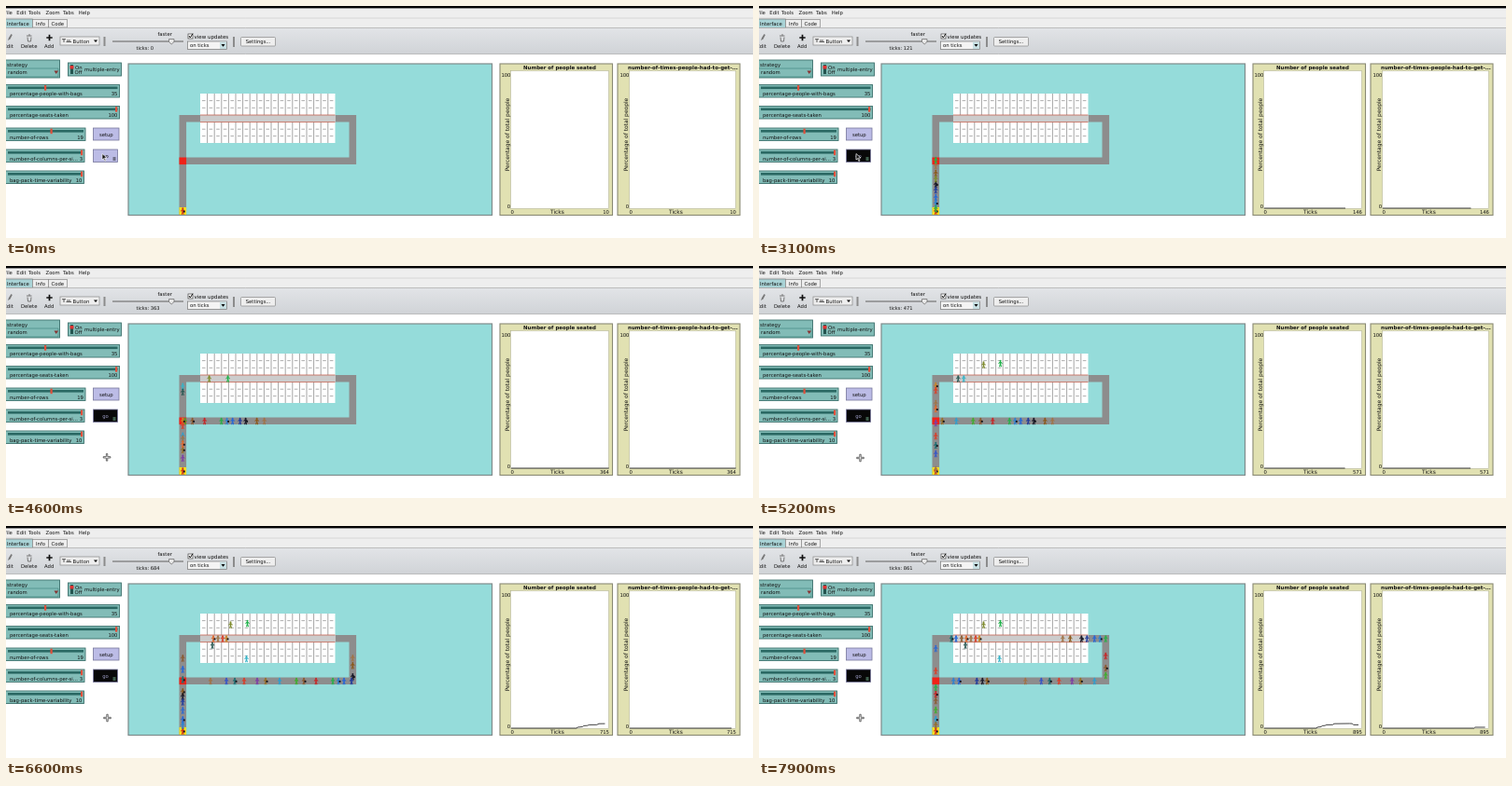
Write an HTML page that moves like this. It is 800 px wide and 249 px high and loops after 8000 ms.

```html
<!DOCTYPE html>
<html lang="en">
<head>
<meta charset="utf-8">
<title>Boarding model</title>
<style>
  html, body { margin: 0; width: 100%; height: 100%; overflow: hidden; background: #fff; }
  svg { display: block; width: 800px; height: 249px; }
  text { font: 5.3px "DejaVu Sans", sans-serif; fill: #111; white-space: pre; text-rendering: geometricPrecision; }
  .title { font-size: 5.46px; font-weight: bold; text-anchor: middle; }
  .axis { font-size: 5.95px; }
  .end { text-anchor: end; }
  .mid { text-anchor: middle; }
  .teal { fill: #82bcb7; stroke: #3d716d; stroke-width: .9; }
  .box { fill: #eee; stroke: #888; stroke-width: .7; }
  .lilac { fill: #bcbce6; stroke: #77779c; stroke-width: .8; }
  .line { fill: none; stroke: #111; stroke-width: .8; }
</style>
</head>
<body>
<svg id="stage" viewBox="0 0 800 249">
  <defs>
    <linearGradient id="bar" x2="0" y2="1">
      <stop stop-color="#e2e4e7"/><stop offset="1" stop-color="#d0d3d7"/>
    </linearGradient>
  </defs>

  <!-- menu, tabs, toolbar -->
  <rect width="800" height="24" fill="#eee"/>
  <rect width="800" height="2.4" fill="#000"/>
  <g>
    <text x="-2" y="8.8">File</text><text x="11.3" y="8.8">Edit</text><text x="24" y="8.8">Tools</text>
    <text x="42.5" y="8.8">Zoom</text><text x="61" y="8.8">Tabs</text><text x="77.7" y="8.8">Help</text>
  </g>
  <path d="M0 13H800" stroke="#ccc" stroke-width=".7"/>
  <rect x="-1" y="14" width="29.5" height="9.5" fill="#a9d3d6" stroke="#777" stroke-width=".7"/>
  <rect x="28.5" y="14.5" width="17" height="8.5" class="box"/>
  <rect x="45.5" y="14.5" width="20" height="8.5" class="box"/>
  <text x="1" y="20.5">Interface</text><text x="32" y="20.5">Info</text><text x="48.5" y="20.5">Code</text>
  <rect y="23.5" width="800" height="28" fill="url(#bar)"/>
  <path d="M0 23.5H800M0 51.5H800" stroke="#aaa" stroke-width=".7"/>

  <path d="M2 37L3 34L5.5 30L6.8 31L4.5 35.5Z" fill="#777"/>
  <path d="M22 32H27.5M23 33.5L23.5 38H26.5L27 33.5M24 31H26" fill="none" stroke="#777"/>
  <path d="M43.3 34H49.7M46.5 30.8V37.2" stroke="#111" stroke-width="1.7"/>
  <text x="-2.5" y="45">Edit</text><text x="16" y="45">Delete</text><text x="41" y="45">Add</text>
  <rect x="58" y="33" width="42" height="9" class="box"/>
  <path d="M60 35.7H64M62 35.7V39M64.5 38.5H70M65 37H69" fill="none" stroke="#333" stroke-width=".8"/>
  <text x="71.5" y="39.6">Button</text>
  <path d="M94 36.5H98L96 39Z"/>
  <path d="M105.5 33V43M244 33V44" stroke="#8c8c8c" stroke-width="2"/>
  <path d="M114 38H190" stroke="#888" stroke-width="1.4"/>
  <path d="M174.5 35.5H180V38.5L177.2 41L174.5 38.5Z" fill="#e8e8e8" stroke="#666" stroke-width=".7"/>
  <text x="162.5" y="31.5">faster</text>
  <text id="ticks" x="139.5" y="46.7" style="font-size:5.15px">ticks: 0</text>
  <rect x="195" y="30" width="5" height="5" fill="#fff" stroke="#444" stroke-width=".7"/>
  <path d="M196 32L197.3 34L200 29.7" fill="none" stroke="#111"/>
  <text x="201.5" y="34.7" style="font-size:5.5px">view updates</text>
  <rect x="194.5" y="38" width="42" height="8.5" fill="#f4f4f4" stroke="#777" stroke-width=".7"/>
  <text x="197" y="44">on ticks</text>
  <rect x="229" y="38.5" width="7" height="7.5" fill="#c7dfe2"/>
  <path d="M230.5 41H234.5L232.5 43.7Z"/>
  <rect x="251.5" y="33.5" width="37" height="9.5" rx="1" class="box"/>
  <text x="256.7" y="40">Settings...</text>

  <!-- controls -->
  <rect x="-1" y="58" width="58.5" height="19" class="teal"/>
  <path d="M0 67H56V76H0" fill="none" stroke="#3b827b" stroke-width=".6"/>
  <text x="1" y="65">strategy</text><text x="2" y="73.3">random</text>
  <path d="M51.5 69.5H56L53.7 73Z" fill="#833"/>
  <rect x="66.5" y="61" width="57" height="14" class="teal"/>
  <rect x="69" y="63" width="3" height="10" fill="#24544f"/>
  <rect x="68.5" y="64" width="4" height="3.5" fill="#d33"/>
  <text x="74" y="67.5">On</text><text x="73.5" y="73.3">Off</text><text x="84" y="70">multiple-entry</text>
  <g id="sliders"></g>
  <rect x="93.5" y="131" width="27.5" height="13" class="lilac"/>
  <text x="107.3" y="139.5" class="mid">setup</text>
  <rect id="goBox" x="93.5" y="154" width="26" height="13.5" class="lilac"/>
  <text id="goText" x="106.5" y="163" class="mid">go</text>
  <path id="goLoop" d="M114.5 163H117.5M114.5 165H117.5" stroke-width=".9"/>

  <!-- world -->
  <rect x="131" y="62" width="389.5" height="162.5" fill="#95dcda" stroke="#7f8a8a" stroke-width="1.2"/>
  <path d="M189.3 224V120.8H371.3V166.3H189.3" fill="none" stroke="#8d8d8d" stroke-width="7.6"/>
  <rect x="185.5" y="162.5" width="7.6" height="7.6" fill="#f02218"/>
  <rect x="185.5" y="216" width="7.6" height="8" fill="#f4e020"/>
  <rect x="208" y="94" width="144.5" height="53" fill="#fff"/>
  <rect x="208" y="117" width="144.5" height="7.6" fill="#ccc"/>
  <g id="seats"></g>
  <path d="M208 117H352.5M208 124.6H352.5" stroke="#c4614f" stroke-width=".8"/>
  <g id="people"></g>

  <g id="plots"></g>
  <path id="cursor" stroke-width=".7" stroke-linejoin="round"/>
</svg>
<script>
const $ = id => document.getElementById(id);
const LOOP = 8000, STEP = 100, START = 1400;

function lerp(points, x) {
  if (x <= points[0][0]) return points[0][1];
  for (let i = 1; i < points.length; i++) {
    const [x0, y0] = points[i - 1], [x1, y1] = points[i];
    if (x <= x1) return y0 + (y1 - y0) * (x - x0) / (x1 - x0);
  }
  return points[points.length - 1][1];
}

// Sliders: label, value, top, width, thumb position
$('sliders').innerHTML = [
  ['percentage-people-with-bags', 35, 84.5, 121.5, 42],
  ['percentage-seats-taken', 100, 107.5, 121.5, 118],
  ['number-of-rows', 19, 131, 85, 48.5],
  ['number-of-columns-per-si...', 3, 154, 84, 81],
  ['bag-pack-time-variability', 10, 177, 83.5, 81]
].map(([label, value, y, w, thumb]) => `
  <rect x="-1" y="${y}" width="${w + 1}" height="13.5" class="teal"/>
  <rect x="2" y="${y + 2}" width="${w - 4}" height="2.6" fill="#2a6863"/>
  <rect x="${thumb - 1}" y="${y + .6}" width="2.2" height="5.6" fill="#e0503c"/>
  <text x="4" y="${y + 11.5}">${label}</text>
  <text x="${w - 2}" y="${y + 11.5}" class="end">${value}</text>`).join('');

// Seat grid
const CELL = 7.6;
let walls = '', dashes = '';
for (let i = 0; i < 19; i++) {
  const x = 208 + CELL * i;
  if (i) walls += `M${x} 94V117M${x} 124.6V147`;
  for (const y of [101.6, 109.3, 132.2, 139.6]) dashes += `M${x + 2} ${y}h3.6`;
}
$('seats').innerHTML = `<path d="${walls}" stroke="#808080" stroke-width=".7"/>
  <path d="${dashes}" stroke="#777" stroke-width=".6"/>`;

// Plots
const plots = [
  { x: 529, w: 120.5, left: 540.5, right: 645.5, title: 'Number of people seated', mid: 593,
    data: [[0, 0], [478, 0], [484, 1], [520, 1.5], [530, 2.6], [555, 2.8], [570, 3.6], [625, 3.7],
           [640, 4.8], [780, 5], [805, 4.9], [815, 3.6], [900, 3.6]] },
  { x: 655, w: 131, left: 667.5, right: 781.5, title: 'number-of-times-people-had-to-get-...', mid: 725,
    data: [[0, 0], [768, 0], [776, 1], [900, 1]] }
];
$('plots').innerHTML = plots.map((p, i) => `
  <rect x="${p.x}" y="62" width="${p.w}" height="162.5" fill="#e1e1b2" stroke="#8a8a74" stroke-width="1.1"/>
  <rect x="${p.left}" y="69.5" width="${p.right - p.left}" height="148" fill="#fff" stroke="#aaa98a" stroke-width=".5"/>
  <text x="${p.mid}" y="67.6" class="title">${p.title}</text>
  <text x="${p.left}" y="76" class="end">100</text>
  <text x="${p.left - .5}" y="216.7" class="end">0</text>
  <text x="${p.left}" y="222.7">0</text>
  <text x="${p.left + 42.5}" y="222.5" class="axis">Ticks</text>
  <text id="max${i}" x="${p.right + .5}" y="222.7" class="end">10</text>
  <text class="axis mid" transform="translate(${p.left - 2} 138) rotate(-90)">Percentage of total people</text>
  <path id="line${i}" class="line"/>`).join('');

function axisMax(ticks) {
  let m = 10;
  while (ticks > m) m = (m < 146 ? Math.floor : Math.round)(1.25 * (m + 1));
  return m;
}

function drawPlot(p, i, ticks) {
  const max = axisMax(ticks);
  $('max' + i).textContent = max;
  const pts = [...p.data.filter(d => d[0] < ticks), [ticks, lerp(p.data, ticks)]];
  const at = ([t, v]) => `${p.left + .5 + t / max * (p.right - p.left)} ${217 - v}`;
  $('line' + i).setAttribute('d', ticks ? 'M' + pts.map(at).join('L') : '');
}

// Passengers: each trails the leader by a fixed distance along a route
const BODY = 'M105 90L60 150L75 180L115 130L120 195L90 285L105 300H135L150 225L165 300H195L210 285' +
  'L180 195L185 130L225 180L240 150L195 90H172V79H127V90Z M150 5a40 40 0 1 0 .1 0Z';
const HUES = ['#a07448', '#8b5a1c', '#1b1b2a', '#203c9c', '#2468d8', '#2d82d2', '#27b04a', '#c62828',
  '#8a5b32', '#3fae2f', '#2f9fce', '#96702a', '#7d3fa6', '#d8402a', '#1f6f73', '#3556c8'];
const X0 = 189.3, Y0 = 219.5, X1 = 371.3, LOW = 166.3, AISLE = 120.8;

function longWay(d) {
  if (d < 53) return [X0, Y0 - d];
  if (d < 235) return [X0 + d - 53, LOW];
  if (d < 280) return [X1, LOW - d + 235];
  return [X1 - d + 280, AISLE];
}

function shortWay(d, stop = 999, seatY = AISLE) {
  if (d < 98) return [X0, Y0 - d];
  const x = X0 + d - 98, over = Math.max(0, x - stop);
  const dy = seatY - AISLE;
  return [Math.min(x, stop), AISLE + Math.sign(dy) * Math.min(Math.abs(dy), over)];
}

const crowd = [0, 8, 20, 26, 34, 40, 46, 64, 77, 85, 103, 118, 127, 141, 151, 160, 177, 218, 223, 229,
  248, 254, 280, 287, 294, 304, 314, 320].map((lag, i) =>
    ({ lag, hue: HUES[i % 16], bag: i % 3 === 2, way: longWay }));
[ // lag, colour, stop, seat height
  [-6, '#22b24c', 258.5, 104.5], [14, '#7d8a2c', 240.5, 106],
  [50, '#38b4c8', 257.5, 142.5], [56, '#2b5a55', 221, 128],
  [87, '#c8862a', 236], [92, '#d8402a', 232], [106, '#a07448', 227], [112, '#e06a30', 222],
  [182, '#8a5b32', 217], [194, '#2468d8', 211], [205, '#1f6f73', 206], [238, '#2d6ad0'], [262, '#d8402a']
].forEach(([lag, hue, stop, seat], i) =>
  crowd.push({ lag, hue, bag: i > 3 && i % 3 === 1, gaveWay: lag === 14, way: d => shortWay(d, stop, seat) }));

const figure = (hue, bag) => `<path d="${BODY}" fill="${hue}"/>` +
  (bag ? '<rect x="170" y="135" width="75" height="75" fill="#16161c"/>' : '');
const place = (x, y) => `translate(${x - 3.8} ${y - 3.8}) scale(.0255)`;
$('people').innerHTML = `<g transform="${place(X0, Y0 + .5)}">${figure('#d42a1c', true)}</g>` +
  crowd.map(p => `<g>${figure(p.hue, p.bag)}</g>`).join('');
const nodes = [...$('people').children].slice(1);

const LEAD = [[0, 0], [121, 48], [236, 96], [471, 178], [591, 222], [776, 297], [861, 326]];
const TICKS = [[1300, 0], [2400, 78], [2500, 78], [2600, 86], [2700, 86], [2800, 94], [2900, 94],
  [3000, 106], [3100, 121], [3900, 236], [5200, 471], [6000, 591], [7200, 776], [7900, 861]];

function drawPeople(ticks) {
  const lead = lerp(LEAD, ticks);
  crowd.forEach((p, i) => {
    const d = lead - p.lag, on = ticks > 0 && d > 0;
    nodes[i].style.display = on ? '' : 'none';
    if (!on) return;
    let [x, y] = p.way(d);
    if (p.gaveWay && ticks > 720 && ticks < 810) y = 114;
    nodes[i].setAttribute('transform', place(x, y));
  });
}

const CROSS = 'M-.7 -3.8H.7V-.7H3.8V.7H.7V3.8H-.7V.7H-3.8V-.7H-.7Z';
const ARROW = 'M-1 -3.5L4 1H1.5L3 4L1.8 4.5L.6 1.7L-1 3Z';

function drawCursor(t) {
  const x = lerp([[3000, 104], [3100, 105], [3900, 105], [4700, 108.5]], t);
  const y = lerp([[3100, 162], [3700, 200], [3900, 200.5], [4700, 206]], t);
  const cross = y > 170, cursor = $('cursor');
  cursor.setAttribute('transform', `translate(${x} ${y})`);
  cursor.setAttribute('d', cross ? CROSS : ARROW);
  cursor.setAttribute('fill', cross ? '#fff' : '#111');
  cursor.setAttribute('stroke', cross ? '#333' : '#fff');
}

function draw(now) {
  const t = Math.floor(now % LOOP / STEP) * STEP;
  const ticks = Math.round(lerp(TICKS, t)), on = t >= START;
  $('ticks').textContent = 'ticks: ' + ticks;
  $('goBox').style.fill = on ? '#080808' : '#bcbce6';
  $('goText').style.fill = on ? '#9a9ac0' : '#111';
  $('goLoop').setAttribute('stroke', on ? '#7fc8a0' : '#111');
  plots.forEach((p, i) => drawPlot(p, i, ticks));
  drawPeople(ticks);
  drawCursor(t);
}

const began = performance.now();
function frame() {
  draw(performance.now() - began);
  requestAnimationFrame(frame);
}
frame();
</script>
</body>
</html>
```
